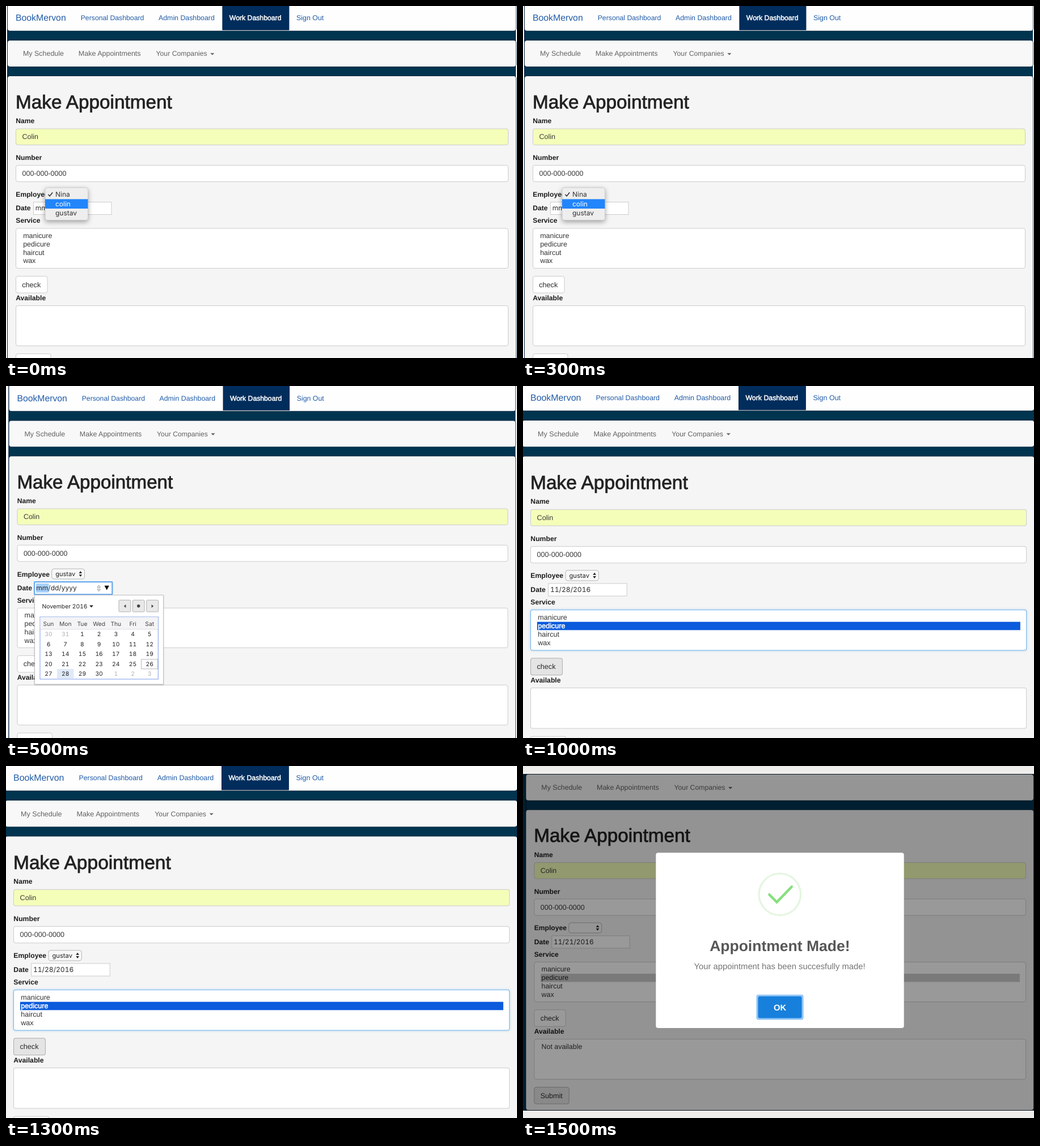
An HTML page for the animation above (2 s loop, 901x622 px).

```html
<!DOCTYPE html>
<html lang="en">
<head>
<meta charset="utf-8">
<title>Make Appointment</title>
<style>
html, body { margin: 0; width: 100%; height: 100%; overflow: hidden; background: #fff; }
svg { display: block; width: 901px; height: 622px; }
text { font-family: "Liberation Sans", Arial, sans-serif; text-rendering: geometricPrecision; white-space: pre; }
.scene { visibility: hidden; animation: show 2s step-end infinite; animation-delay: calc(var(--i) * .5s - 2s); }
@keyframes show { 0% { visibility: visible; } 25%, 100% { visibility: hidden; } }
.b { font-weight: bold; }
.mid { text-anchor: middle; }
.medium { stroke-width: .5px; }
.heading { stroke-width: .8px; }
.ui { font-family: Inter, sans-serif; font-variant-numeric: tabular-nums; }
.panel { paint-order: stroke; stroke-width: 1.6px; }
.menu { filter: drop-shadow(0 3px 4px rgba(0, 0, 0, .35)); }
.drop { filter: drop-shadow(0 1px 1px rgba(0, 0, 0, .2)); }
.glow { filter: drop-shadow(0 0 2px rgba(102, 175, 233, .5)); }
</style>
</head>
<body>
<svg id="stage" viewBox="0 0 901 622"></svg>
<script>
const INK = '#222', LINK = '#215ca8', GREY = '#626262', FIELD = '#3a3a3a', LINE = '#ccc';
const BAND = '#00344f', NAVY = '#002d5c', EDGE = '#002038';

const rect = (x, y, x2, y2, fill, stroke = 'none', r = 0, extra = '') =>
  `<rect x="${x}" y="${y}" width="${x2 - x}" height="${y2 - y}" rx="${r}" fill="${fill}" stroke="${stroke}" ${extra}/>`;
const text = (x, y, str, size = 12.45, fill = INK, cls = '') =>
  `<text x="${x}" y="${y}" font-size="${size}" fill="${fill}" class="${cls}" ${/medium|heading/.test(cls) ? `stroke="${fill}"` : ''}>${str}</text>`;
const label = (y, str) => text(17.3, y, str, 12.15, '#1c1c1c', 'b');
const panel = (y, y2, fill) => rect(3, y, 899, y2, fill, EDGE, 4, 'class="panel"');
const field = (y, y2, fill = '#fff', stroke = LINE, extra = '') =>
  rect(17.5, y, 885.5, y2, fill, stroke, 3.5, extra);
const button = (x2, y, str, active) =>
  rect(17.5, y, x2, y + 29.5, active ? '#e4e4e4' : '#fff', active ? '#adadad' : LINE, 3.5) +
  text(28.3, y + 19, str, 12.6, '#2a2a2a');
// triangle centred on x, from flat side y to tip
const tri = (x, y, half, h, fill) => `<path d="M${x - half} ${y}h${2 * half}l${-half} ${h}z" fill="${fill}"/>`;

function select(value) {
  return rect(78.5, 323.5, 136.5, 341.5, '#f8f8f8', '#b5b5b5', 4) +
    text(85, 336.5, value, 11.1, '#222', 'ui') +
    tri(129.3, 331.4, 2.8, -4, '#222') + tri(129.3, 333.6, 2.8, 4, '#222');
}

function services(chosen, focus) {
  const row = { blue: ['#0b5bdc', '#fff'], grey: ['#cbcbcb', '#222'] }[chosen];
  return field(393, 463.5, '#fff', focus ? '#74b6ea' : LINE, focus ? 'class="glow"' : '') +
    (row ? rect(28.8, 413.7, 874.8, 428.2, row[0]) : '') +
    ['manicure', 'pedicure', 'haircut', 'wax'].map((name, i) => {
      const on = row && i === 1;
      return text(30.2, 409.7 + 14.9 * i, name, 12.45, on ? row[1] : '#333', on && focus ? 'medium' : '');
    }).join('');
}

function page(transform, { employee = '', date = '', chosen, focus, checked, slots = '' }) {
  return `<g transform="matrix(${transform})">` +
    rect(2, -10, 899, 656, BAND) +
    rect(2, -10, 3.2, 656, '#00143a') +
    panel(-10, 43.7, '#fefefe') + panel(61, 106.9, '#f8f8f8') + panel(124, 655, '#f5f5f5') +
    rect(381.9, -10, 498.9, 42.2, NAVY, '#001f4a') +
    text(17, 26, 'BookMervon', 15.8, LINK) +
    text(131.7, 25.2, 'Personal Dashboard', 12.25, LINK) +
    text(269, 25.2, 'Admin Dashboard', 12.35, LINK) +
    text(393.8, 25.2, 'Work Dashboard', 12.25, '#fff', 'medium') +
    text(512, 25.2, 'Sign Out', 12.4, LINK) +
    text(30, 88.3, 'My Schedule', 12.45, GREY) +
    text(127.8, 88.3, 'Make Appointments', 12.5, GREY) +
    text(264.5, 88.3, 'Your Companies', 12.25, GREY) +
    tri(363.8, 83.2, 3.6, 3.6, GREY) +
    text(17, 180.5, 'Make Appointment', 33.3, INK, 'heading') +
    label(207.2, 'Name') + field(217, 245.5, '#f5feb9') + text(28.5, 235.3, 'Colin', 12.5, FIELD) +
    label(272.2, 'Number') + field(281.5, 310.5) + text(28.5, 300.3, '000-000-0000', 12.5, FIELD) +
    label(337, 'Employee') + select(employee) +
    label(361.4, 'Date') + rect(48.5, 346.5, 186, 368.5, '#fff', LINE) + text(51.7, 361.4, date, 12, '#2a2a2a', 'ui') +
    label(383.4, 'Service') + services(chosen, focus) +
    button(73, 477.5, 'check', checked) +
    label(520.2, 'Available') + field(529.5, 600.5) + text(30.2, 546.7, slots, 12.45, '#333') +
    button(79, 614.5, 'Submit', slots !== '') +
    '</g>';
}

function menu() {
  return rect(69, 321, 144.6, 378.5, '#eee', '#bbb', 4, 'class="menu" stroke-width=".6"') +
    rect(69, 341.3, 144.4, 358, '#2285fb') +
    '<path d="M74.5 333l2.6 3 5-6.5" fill="none" stroke="#222" stroke-width="1.4"/>' +
    text(87, 337, 'Nina', 12, '#333', 'ui') +
    text(87, 353.8, 'colin', 12, '#fff', 'ui') +
    text(87, 370.4, 'gustav', 12, '#333', 'ui');
}

function calendar() {
  const colX = i => 75 + 29.7 * i;
  let s = rect(50, 346.2, 187.3, 368.3, '#fff', '#68abf0', 1, 'stroke-width="2.2"') +
    rect(53, 349, 75.5, 365, '#a8d1fb') +
    text(53.3, 361.2, 'mm/dd/yyyy', 12, '#2a2a2a', 'ui') +
    '<path d="M161 356l2.7-4 2.7 4zM161 359l2.7 4 2.7-4z" fill="none" stroke="#888" stroke-width=".9"/>' +
    tri(177.7, 352.8, 4.2, 8, '#111') +
    rect(50.5, 369.5, 277.5, 527, '#fff', '#c0c0c0', 0, 'class="drop"') +
    text(63.5, 393, 'November 2016', 10.3, '#222', 'ui') + tri(150.5, 387.6, 3.4, 4, '#222');
  for (const x of [199, 223.3, 247.8]) s += rect(x, 378.3, x + 20.8, 399, '#e9e9e9', '#b0b0b0', 1.5);
  s += '<path d="M211.4 386v6l-3.6-3zM256.6 386v6l3.6-3z" fill="#444"/><circle cx="233.7" cy="388.8" r="2.7" fill="#444"/>';
  s += rect(60, 408, 268.3, 518, '#fff', '#7e9ce8') + rect(60.5, 408.5, 268, 430, '#f4f4f6') +
    rect(60.5, 429.6, 268, 430.3, '#d5d5d8') +
    rect(90, 500, 119.5, 517.3, '#dfe9f8') + rect(238.5, 483, 267.5, 499.8, '#fff', '#b8b8b8');
  'Sun Mon Tue Wed Thu Fri Sat'.split(' ').forEach((d, i) => s += text(colX(i), 423.6, d, 10.3, '#444', 'ui mid'));
  for (let i = 0; i < 35; i++) {
    const n = i - 1, out = n < 1 || n > 30;
    const day = n < 1 ? n + 31 - 1 + 1 : n > 30 ? n - 30 : n;
    s += text(colX(i % 7), 442.4 + 17.5 * Math.floor(i / 7), day, 10.3, out ? '#b0b0b0' : '#222', 'ui mid');
  }
  return s;
}

function dialog() {
  return rect(0, 14, 901, 609, 'rgba(0,0,0,.4)') +
    rect(0, 0, 901, 14, '#efedeb') + rect(0, 609, 901, 622, '#efedeb') +
    rect(234.3, 153.2, 671.7, 463, '#fff', 'none', 4) +
    '<circle cx="452.8" cy="226.8" r="36.8" fill="none" stroke="#e4f6e0" stroke-width="3.2"/>' +
    '<path d="M434.3 227.2l13.2 13.3 26.3-27.2" fill="none" stroke="#85e07c" stroke-width="4.4" stroke-linecap="round"/>' +
    text(452.8, 327.2, 'Appointment Made!', 26.5, '#575757', 'b mid') +
    text(452.6, 358.6, 'Your appointment has been succesfully made!', 14.8, '#757575', 'mid') +
    rect(411.4, 404, 494.6, 448.6, '#93c5f5', 'none', 4) +
    rect(414.5, 407, 491.5, 445.5, '#1780dc', 'none', 3) +
    text(453, 431.8, 'OK', 14.8, '#fff', 'b mid');
}

const scenes = [
  page('1,0,0,1,0,0', { date: 'mm' }) + menu(),
  page('.9965,0,0,.9965,2.5,.7', { employee: 'gustav' }) + calendar(),
  page('1.007,0,0,1.0085,-4.1,-.5', { employee: 'gustav', date: '11/28/2016', chosen: 'blue', focus: true, checked: true }),
  rect(0, 14, 901, 609, BAND) +
    page('.9985,0,0,.9985,2.4,-46', { date: '11/21/2016', chosen: 'grey', slots: 'Not available' }) + dialog()
];
document.getElementById('stage').innerHTML =
  scenes.map((s, i) => `<g class="scene" style="--i:${i}">${s}</g>`).join('');
</script>
</body>
</html>
```
